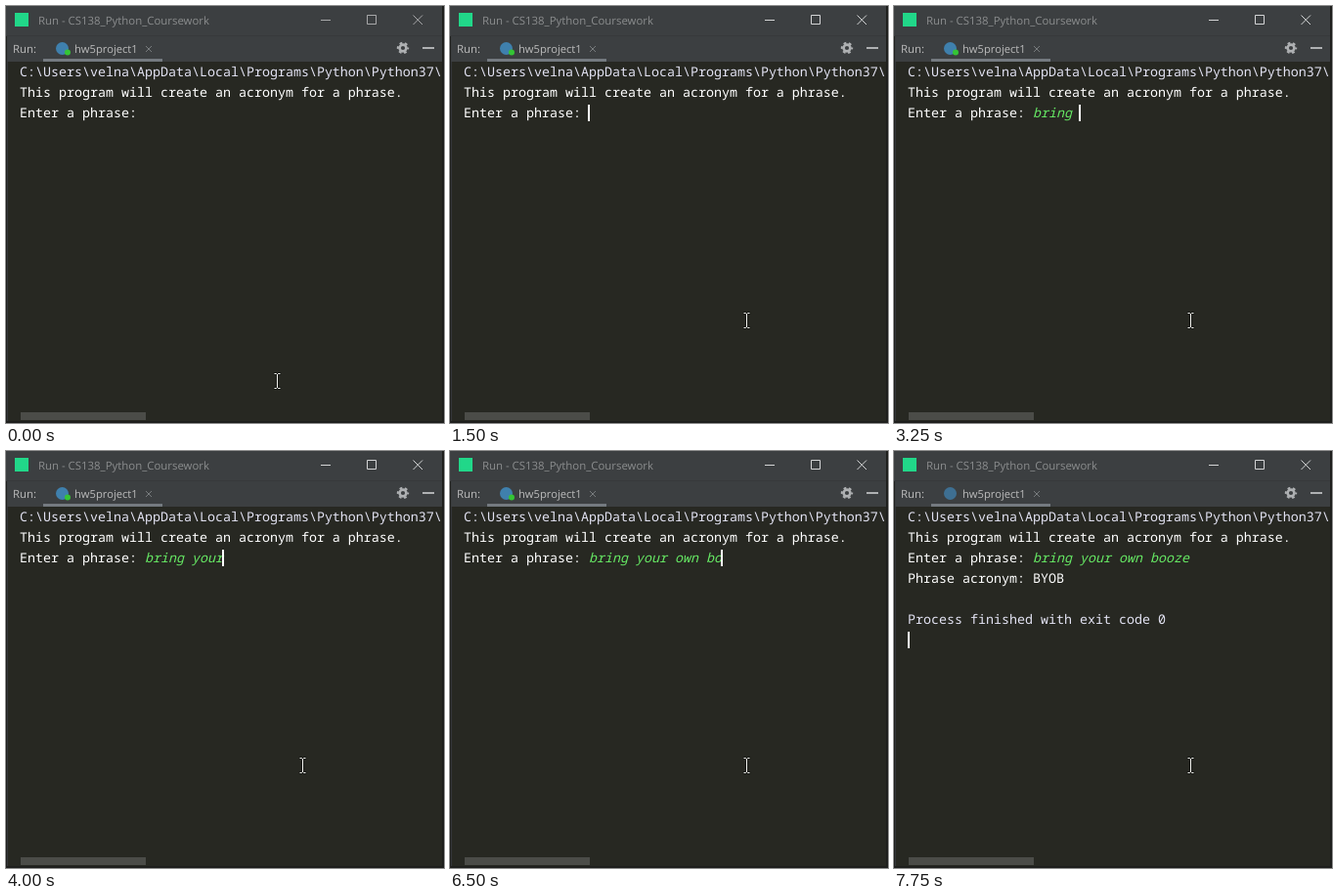
Write an HTML page that moves like this. It is 448 px wide and 427 px high and loops after 8000 ms.

```html
<!DOCTYPE html>
<html lang="en">
<head>
<meta charset="utf-8">
<title>Acronym program</title>
<style>
  html, body { margin: 0; width: 100%; height: 100%; overflow: hidden; background: #272822; }
  svg { display: block; width: 448px; height: 427px; }
  text { white-space: pre; text-rendering: geometricPrecision; }
  .ui { font: 11.4px "Open Sans", "Noto Sans", sans-serif; fill: #bbbbbb; }
  .mono { font: 500 13.333px "Noto Sans Mono", "DejaVu Sans Mono", monospace; fill: #ffffff; }
  .system { fill: #e2e2f2; }
  .typed { font-style: italic; fill: #66e864; }
  .line { fill: none; stroke: #d4d5d6; stroke-width: 1; }
</style>
</head>
<body>
<svg viewBox="0 0 448 427">
  <rect width="448" height="427" fill="#272822"/>

  <!-- console -->
  <g class="mono">
    <text x="14" y="72" class="system">C:\Users\velna\AppData\Local\Programs\Python\Python37\</text>
    <text x="14" y="93">This program will create an acronym for a phrase.</text>
    <text x="14" y="114">Enter a phrase:</text>
    <text x="142" y="114" class="typed" id="typed"></text>
    <g id="output">
      <text x="14" y="135">Phrase acronym: BYOB</text>
      <text x="14" y="177" class="system">Process finished with exit code 0</text>
    </g>
  </g>
  <rect id="caret" width="2" height="17" fill="#ffffff"/>
  <rect x="15" y="416" width="128" height="8" fill="#4b4c48"/>

  <!-- title bar -->
  <rect width="448" height="30" fill="#3c3f41"/>
  <rect x="9" y="7" width="14" height="14" fill="#21d789"/>
  <text x="33" y="19" class="ui" style="fill:#8b8d8e">Run - CS138_Python_Coursework</text>
  <path id="controls" class="line" d="M322 14.5h10M369.5 9.5h9v9h-9zM416.5 9.5l9.5 9.5M426 9.5l-9.5 9.5"/>

  <!-- tool header -->
  <rect y="30" width="448" height="1" fill="#37393b"/>
  <rect y="31" width="448" height="26" fill="#3c3f41"/>
  <rect x="38" y="54" width="122" height="3" fill="#747a80"/>
  <text x="7" y="48" class="ui">Run:</text>
  <circle id="tabIcon" cx="57.5" cy="43.5" r="6.5" fill="#3f80ad"/>
  <circle id="running" cx="63" cy="47.5" r="3" fill="#35c435"/>
  <text x="70" y="48" class="ui" style="font-size:11.2px">hw5project1</text>
  <path class="line" style="stroke:#777b7d" d="M143 41l6 6M149 41l-6 6"/>
  <g fill="none" stroke="#afb1b3">
    <circle cx="406" cy="43" r="3.4" stroke-width="2.6"/>
    <circle cx="406" cy="43" r="5.2" stroke-width="2" stroke-dasharray="2.7 2.745" stroke-dashoffset="1.35"/>
    <path d="M426 43h12" stroke-width="2"/>
  </g>

  <!-- window edges -->
  <path d="M0 31h1v394h445v-425h2v427h-448z" fill="#1e1f1d"/>
  <path d="M1.5 57v368" stroke="#34363a"/>

  <g id="mouse" fill="none" stroke-linecap="square">
    <path d="M-2.5-7.5h1.5l1 1 1-1h1.5M0-6.5v13M-2.5 7.5h1.5l1-1 1 1h1.5" stroke="#161714" stroke-width="2.4"/>
    <path d="M-2.5-7.5h1.5l1 1 1-1h1.5M0-6.5v13M-2.5 7.5h1.5l1-1 1 1h1.5" stroke="#f4f4f0"/>
  </g>
</svg>
<script>
  const LOOP = 8000, FOCUS = 500, DONE = 7750, CHAR = 8;
  const phrase = "bring your own booze";
  // [time, characters typed]
  const keys = [
    [2000, 1], [2250, 3], [2500, 4], [3000, 5], [3250, 6], [3500, 7],
    [3750, 8], [4000, 10], [4250, 11], [4500, 12], [4750, 13], [5000, 15],
    [5750, 16], [6500, 17], [6750, 18], [7000, 19], [7250, 20]
  ];
  const el = id => document.getElementById(id);
  const [typed, output, caret, controls, tabIcon, running, mouse] =
    ["typed", "output", "caret", "controls", "tabIcon", "running", "mouse"].map(el);
  const show = (node, on) => node.setAttribute("visibility", on ? "visible" : "hidden");

  function draw(t) {
    const done = t >= DONE, focused = t >= FOCUS;
    const count = keys.reduce((n, [at, len]) => t >= at ? len : n, 0);
    typed.textContent = phrase.slice(0, count);

    caret.setAttribute("x", done ? 14 : 141 + count * CHAR);
    caret.setAttribute("y", done ? 185 : 101);
    show(caret, focused && !(t >= 1000 && t < 1500));

    show(output, done);
    show(running, !done);
    tabIcon.setAttribute("opacity", done ? 0.75 : 1);
    controls.setAttribute("opacity", focused ? 1 : 0.7);
    mouse.setAttribute("transform", t < 250 ? "translate(277.5 384)" : "translate(303.5 322)");
  }

  const start = performance.now();
  function tick() {
    draw((performance.now() - start) % LOOP);
    requestAnimationFrame(tick);
  }
  tick();
</script>
</body>
</html>
```
